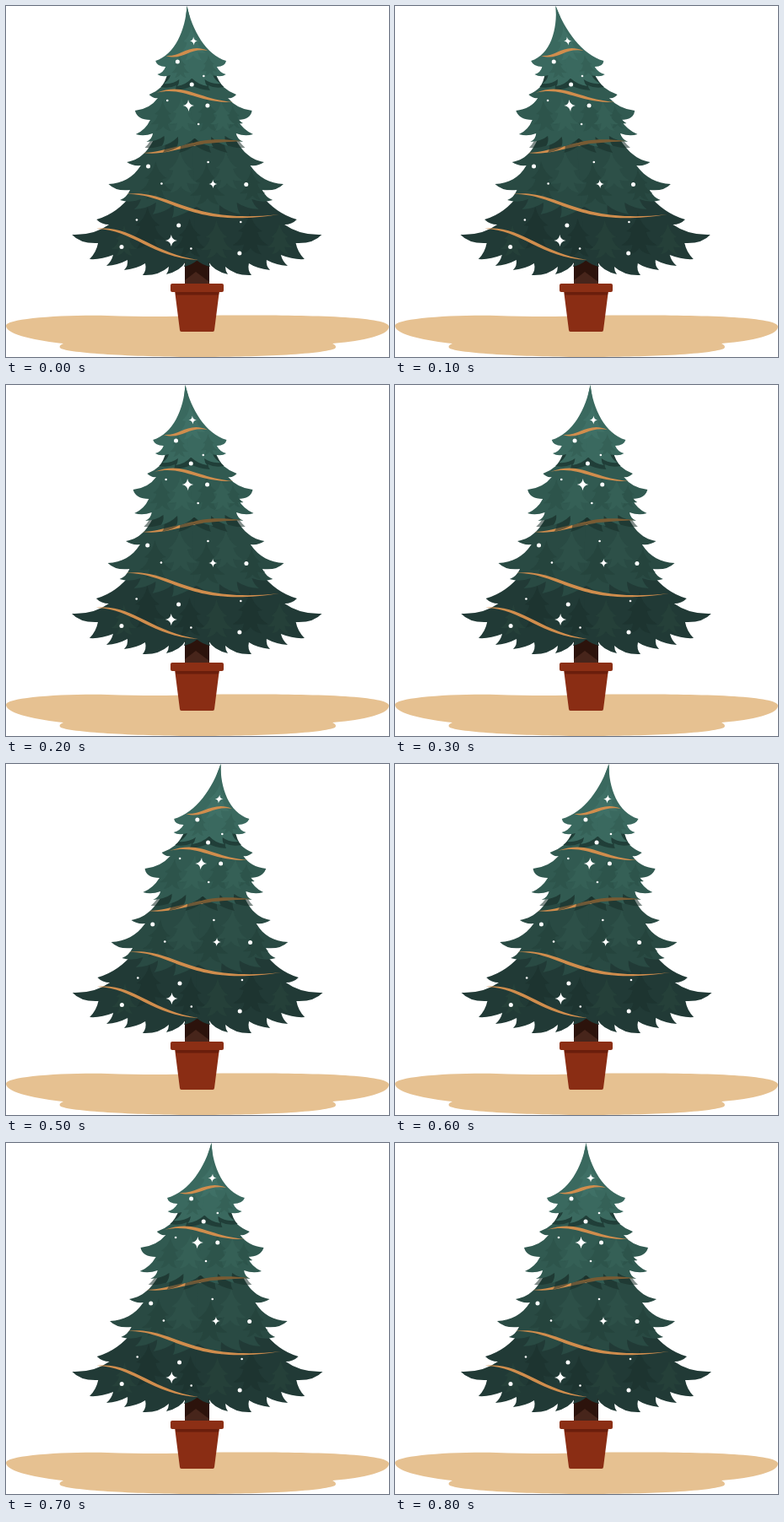
An HTML page with a canvas that plays this animation: 454 px wide and 416 px high, repeating every 0.9 s.

```html
<!DOCTYPE html>
<html lang="en">
<head>
<meta charset="utf-8">
<title>Swaying Christmas tree</title>
<style>
  html, body { margin: 0; width: 100%; height: 100%; overflow: hidden; background: #fff; }
  canvas { display: block; }
</style>
</head>
<body>
<canvas id="stage" width="454" height="416"></canvas>
<script>
const ctx = document.getElementById('stage').getContext('2d');
const STEP = 100, AXIS = 226.5, ROOT = 330;

// One entry per step: tip offset, sideways squeeze and softness of the tree.
const poses = [
  [-12, .16, .5], [-36, .12, .5], [-14, .10, .5],
  [5, .095, .45], [21, .09, .35], [28, .065, .25],
  [27, .04, .15], [17, .02, 0], [0, 0, 0]
];
let sway = 0, squeeze = 0;

// The bend grows from the root of the tree towards its tip.
function bend(x, y) {
  const weight = Math.max(0, 1 - y / ROOT) ** 2.2;
  return [x + weight * (sway - squeeze * (x - AXIS)), y];
}

function fill(d, color) {
  ctx.fillStyle = color;
  ctx.fill(new Path2D(d));
}

function fillBent(d, color, place = (x, y) => [x, y]) {
  fill(d.replace(/(-?[\d.]+),(-?[\d.]+)/g, (_, x, y) => bend(...place(+x, +y)).join()), color);
}

function fillMirrored(d, color) {
  fillBent(d, color);
  fillBent(d, color, (x, y) => [2 * AXIS - x, y]);
}

// Left halves; each reaches slightly past the axis so both sides join.
const tiers = {
  bottom: 'M229,215 L150,222 Q132,246 107,253 Q113,259 122,259 Q104,272 78,271 Q88,282 109,281 ' +
    'Q107,292 99,300 Q112,301 127,295 Q125,303 119,308 Q133,307 144,301 Q145,308 140,313 ' +
    'Q156,311 165,305 Q167,313 162,319 Q181,320 193,309 Q193,314 190,318 Q207,314 213,303 ' +
    'Q212,306 211,309 Q220,307 226,302 L229,302Z',
  lower: 'M229,140 L180,150 C172,168 162,182 143,185 Q150,190 160,189 C150,204 138,210 121,211 ' +
    'Q130,220 147,218 Q143,227 135,230 Q147,234 160,229 Q158,236 152,241 Q168,240 178,233 ' +
    'Q178,241 174,247 Q190,244 199,236 Q200,246 197,251 Q212,247 226,238 L229,238Z',
  upper: 'M229,80 L200,80 Q190,98 171,105 Q176,110 182,109 Q172,122 153,124 Q156,135 172,135 ' +
    'Q166,147 154,152 Q164,155 175,151 Q174,158 167,161 Q181,160 189,154 Q190,160 186,166 ' +
    'Q198,163 206,155 Q207,163 204,167 Q217,165 226,157 L229,157Z',
  top: 'M226.5,0 C222,28 206,58 180,65 Q182,72 193,72 Q190,79 182,81 Q188,85 199,82 ' +
    'Q197,88 190,92 Q202,93 210,87 Q210,92 207,95 Q219,93 226,86 L229,86 L229,12Z'
};
const shadows = {
  upper: 'M229,150 L177,148 Q173,161 165,168 Q179,169 190,164 Q190,170 187,174 Q201,171 209,165 ' +
    'Q209,170 207,174 Q219,171 229,163Z',
  top: 'M229,78 L196,78 Q192,91 186,96 Q198,98 206,94 Q206,97 204,100 Q219,99 229,93Z'
};

const frondShape = 'M0,0 Q-3,14 -13,20 L-8,21 Q-10,30 -19,35 Q-11,36 -7,34 Q-8,40 -12,45 ' +
  'Q-4,44 0,38 Q4,44 12,45 Q8,40 7,34 Q11,36 19,35 Q10,30 8,21 L13,20 Q3,14 0,0Z';

function fronds(color, ...spots) {
  for (const [x, y, size] of spots)
    fillBent(frondShape, color, (px, py) => [x + px * size, y + py * size]);
}

// A ribbon from a to d that thins out at both ends.
function garland([a, b, c, d], color = '#d08d4d') {
  const shift = ([x, y], dy) => x + ',' + (y + dy);
  fillBent(`M${a} C${shift(b, -2.7)} ${shift(c, -2.7)} ${d} ` +
    `C${shift(c, 2.7)} ${shift(b, 2.7)} ${a}Z`, color);
}

function dots(radius, ...centers) {
  ctx.fillStyle = '#fff';
  for (const [x, y] of centers) {
    ctx.beginPath();
    ctx.arc(...bend(x, y), radius, 0, 2 * Math.PI);
    ctx.fill();
  }
}

function sparkle(x, y, r) {
  const k = r * .13;
  fillBent(`M0,${-r} Q${k},${-k} ${r},0 Q${k},${k} 0,${r} Q${-k},${k} ${-r},0 Q${-k},${-k} 0,${-r}Z`,
    '#fff', (px, py) => [x + px, y + py]);
}

function drawBase() {
  fill('M0,379 C0,371 60,366 120,367 Q180,369 226,367 C320,366 454,366 454,380 C454,392 412,398 387,400 ' +
    'Q393,403 390,406 C370,414 280,416 226,416 C160,416 80,412 65,406 Q61,403 68,400 C40,397 0,390 0,379Z', '#e6c191');
  fill('M212,298H241V331H212Z', '#2c130c');
  fill('M212,325L225,315L241,327V331H212Z', '#47251b');
  fill('M200,337H253L247,384Q247,386 245,386H208Q206,386 206,384Z', '#8a2d14');
  fill('M201,339H252.5L252,342.5H201.5Z', '#6a1e0c');
  fill('M197,329H256Q258,329 258,331V337Q258,339 256,339H197Q195,339 195,337V331Q195,329 197,329Z', '#8c2f15');
}

function drawTree() {
  fillMirrored(tiers.bottom, '#213a36');
  fronds('#1d3430', [168, 238, 1.1], [218, 252, 1], [290, 245, 1.1]);
  fronds('#254039', [140, 260, .8], [250, 254, 1], [325, 258, .8]);
  garland([[107, 264], [150, 262], [173, 296], [228, 301]]);

  fillMirrored(tiers.lower, '#294a43');
  fronds('#25443d', [178, 184, 1], [240, 186, 1.1], [294, 194, .8]);
  fronds('#2d5048', [208, 172, 1.1], [264, 172, 1]);
  garland([[163, 174], [195, 176], [222, 157], [284, 160]]);
  fillMirrored(shadows.upper, 'rgba(24,46,40,.55)');
  garland([[142, 223], [196, 219], [215, 262], [325, 247]]);

  fillMirrored(tiers.upper, '#315a51');
  fronds('#2d544b', [188, 112, .8], [244, 108, .9], [276, 118, .6]);
  fronds('#356056', [212, 108, .9], [262, 112, .8]);
  garland([[217, 165], [230, 161], [255, 159], [284, 160]], '#795b33');
  fillMirrored(shadows.top, '#203e38');
  garland([[180, 103], [216, 92], [232, 113], [278, 114]]);

  fillMirrored(tiers.top, '#3a695f');
  fronds('#356157', [212, 58, .6], [250, 58, .55]);
  fronds('#3f7066', [230, 24, .9]);
  garland([[194, 59], [215, 63], [226, 46], [250, 53]]);

  sparkle(232, 41.5, 5);
  sparkle(220.5, 118, 7);
  sparkle(247, 211, 5);
  sparkle(196, 278, 7);
  dots(2.5, [209, 66], [226, 93], [244.5, 118], [169, 190], [287, 211.5], [205, 260], [137, 285.5], [277, 293]);
  dots(1.3, [242, 83], [194, 112], [232, 140], [242, 185], [185, 210.5], [155, 253.5], [279, 256], [219.5, 287.5]);
}

function draw(pose) {
  let softness;
  [sway, squeeze, softness] = pose;
  ctx.clearRect(0, 0, 454, 416);
  drawBase();
  ctx.filter = softness ? `blur(${softness}px)` : 'none';
  drawTree();
  ctx.filter = 'none';
}

let shown = -1;
function tick() {
  const index = Math.floor(performance.now() / STEP) % poses.length;
  if (index !== shown) draw(poses[shown = index]);
  requestAnimationFrame(tick);
}
tick();
</script>
</body>
</html>
```
